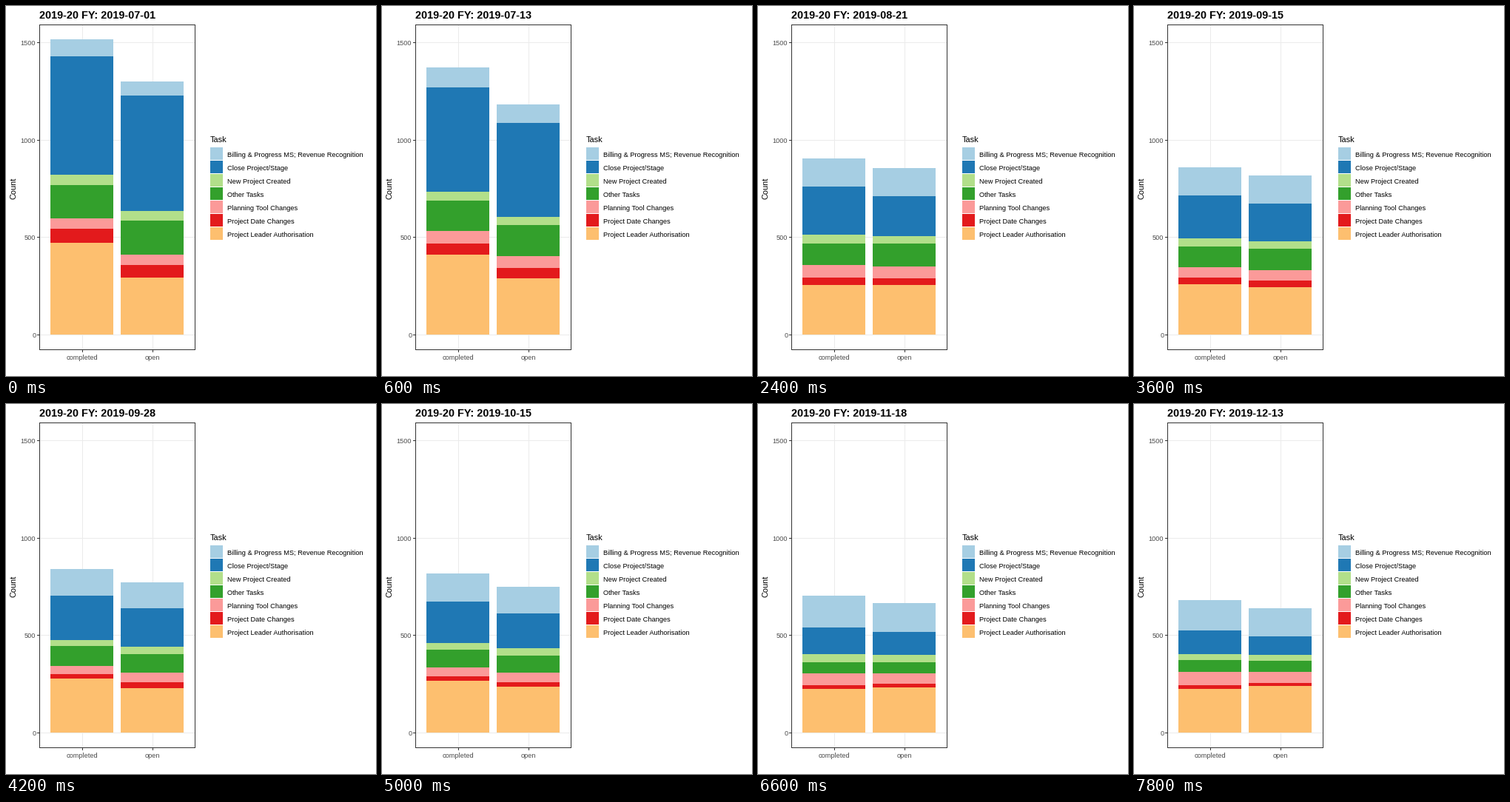
A matplotlib script that plays this animation: 500 by 500 pixels, repeating every 8 s.

```python
import matplotlib.pyplot as plt
import numpy as np
from matplotlib.animation import FuncAnimation
from matplotlib.patches import Rectangle

FRAMES, INTERVAL = 40, 200
START = np.datetime64("2019-07-01")
DAYS_PER_FRAME = 4.2525
BASE = 444  # pixel row of a zero count

TASKS = [
    ("Billing & Progress MS; Revenue Recognition", "#A6CEE3"),
    ("Close Project/Stage", "#1F78B4"),
    ("New Project Created", "#B2DF8A"),
    ("Other Tasks", "#33A02C"),
    ("Planning Tool Changes", "#FB9A99"),
    ("Project Date Changes", "#E31A1C"),
    ("Project Leader Authorisation", "#FDBF6F"),
]

# Monthly states, July to January: top edge of each task's segment, in pixels.
MONTHS = [0, 7, 15, 22, 29, 36, 43]
COMPLETED = np.array([
    [45, 68, 228.4, 242, 287.4, 301.3, 320],
    [166.7, 202, 299.4, 309, 339.3, 363, 371.7],
    [215.9, 254.6, 311.8, 323.9, 352.7, 368, 378.3],
    [222.6, 259.1, 318.8, 327.4, 353.7, 364.8, 371],
    [243, 284, 332, 342, 361, 375, 380.6],
    [266.4, 310.2, 340.7, 352.3, 365.4, 382.3, 387],
    [262, 296.7, 332, 332.5, 354.7, 375, 380.6],
])
OPEN = np.array([
    [102, 121.2, 277, 289.6, 336, 350, 367],
    [201, 237, 302, 310.8, 343, 364, 371],
    [223.2, 262.6, 313.3, 323.4, 354.3, 368.5, 378.2],
    [241.5, 276.5, 328.2, 338.1, 363, 376.5, 383.8],
    [259, 297, 334, 344, 363, 375, 378],
    [273.6, 313, 341.3, 351.2, 364.5, 379.4, 385.3],
    [281.2, 316, 334, 337.7, 356.7, 371.8, 371.8],
])

plt.rcParams["font.family"] = "Liberation Sans"
fig = plt.figure(figsize=(5, 5), dpi=100, facecolor="white")
ax = fig.add_axes([0, 0, 1, 1])
ax.set_xlim(0, 500)
ax.set_ylim(500, 0)
ax.axis("off")


def box(x0, y0, x1, y1, color, z=1):
    patch = Rectangle((x0, y0), x1 - x0, y1 - y0, facecolor=color,
                      linewidth=0, antialiased=False, zorder=z)
    return ax.add_patch(patch)


def label(x, y, text, px=9.3, color="black", **kw):
    kw.setdefault("va", "baseline")
    return ax.text(x, y, text, fontsize=px * 0.72, color=color, **kw)


def draw_panel():
    for y, count in zip((444, 312, 181, 49), (0, 500, 1000, 1500)):
        box(46, y, 255, y + 1, "#EBEBEB")
        box(42, y, 45, y + 1, "#333333")
        label(40.3, y + 4.2, str(count), 9.2, "#4D4D4D", ha="right")
    for x, name in ((103, "completed"), (198, "open")):
        box(x, 26, x + 1, 464, "#EBEBEB")
        box(x, 465, x + 1, 468, "#333333")
        label(x - 0.2, 478, name, 9.3, "#4D4D4D", ha="center")
    for edge in ((45, 25, 256, 26), (45, 464, 256, 465),
                 (45, 25, 46, 465), (255, 25, 256, 465)):
        box(*edge, "#333333", 4)
    label(15.5, 246, "Count", 11, rotation=90, ha="right", va="center")


def draw_legend():
    label(275.8, 184, "Task", 11)
    for i, (name, color) in enumerate(TASKS):
        y = 191 + 18 * i
        box(276, y, 293, y + 17, color)
        label(298.6, y + 13, name)


def ease(p):
    return 4 * p**3 if p < 0.5 else 1 - 4 * (1 - p)**3


def tops(states, frame):
    k = np.searchsorted(MONTHS, frame, side="right") - 1
    p = ease((frame - MONTHS[k]) / (MONTHS[k + 1] - MONTHS[k]))
    return np.rint(states[k] + p * (states[k + 1] - states[k]))


draw_panel()
draw_legend()
title = label(45, 17, "", 14.4, weight="bold")
stacks = [
    (states, [box(x, BASE, x + 85, BASE, color, 3) for _, color in TASKS])
    for x, states in ((60, COMPLETED), (155, OPEN))
]


def update(frame):
    day = START + int(frame * DAYS_PER_FRAME)
    title.set_text(f"2019-20 FY: {day}")
    for states, bars in stacks:
        edges = np.append(tops(states, frame), BASE)
        for bar, top, bottom in zip(bars, edges, edges[1:]):
            bar.set_y(top)
            bar.set_height(bottom - top)
    return [title] + [bar for _, bars in stacks for bar in bars]


anim = FuncAnimation(fig, update, frames=FRAMES, init_func=lambda: update(0),
                     interval=INTERVAL, repeat=True, repeat_delay=0)
plt.show()
```
